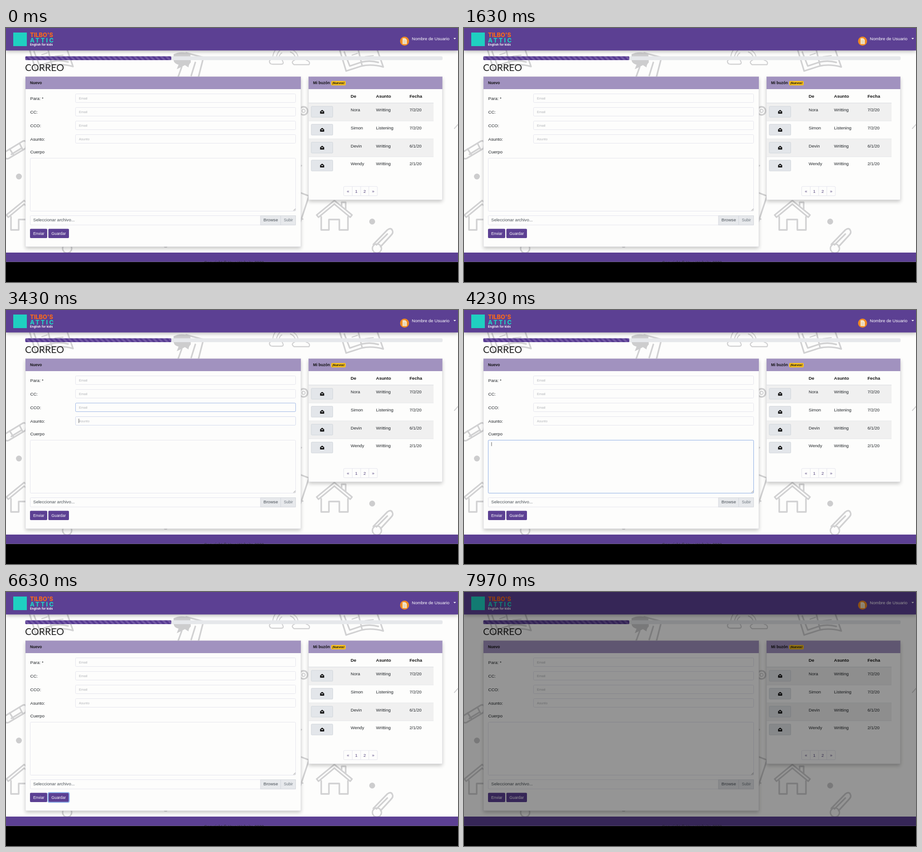
Recreate the animation shown at these times as an HTML page. Size 998 by 561 pixels, loop 8000 ms.

```html
<!DOCTYPE html>
<html lang="es">
<head>
<meta charset="utf-8">
<title>Correo</title>
<style>
  html, body { margin: 0; width: 100%; height: 100%; overflow: hidden; background: #000; }
  svg { display: block; width: 998px; height: 561px; }
  text { font-family: "Liberation Sans", Arial, sans-serif; font-size: 9.6px; fill: #212529; white-space: pre; }
  .b { font-weight: 700; fill: #111; }
  .brand { font-family: Inter, sans-serif; font-weight: 800; }
  .title { font-family: Lato, sans-serif; font-size: 21.2px; fill: #222; }
  .doodles { fill: none; stroke: #d1d1d2; stroke-width: 3.4; stroke-linejoin: round; stroke-linecap: round; }
  .doodles .solid { fill: #cdcdce; stroke: none; }
</style>
</head>
<body>
<svg id="stage" viewBox="0 0 998 561">
  <defs>
    <pattern id="stripes" width="11.7" height="11.7" patternUnits="userSpaceOnUse">
      <rect width="11.7" height="11.7" fill="#553990"/>
      <path d="M0 11.7V5.85L5.85 11.7ZM0 0H5.85L11.7 5.85V11.7Z" fill="#7258a5"/>
    </pattern>
    <filter id="soft" x="-10%" y="-10%" width="120%" height="130%"><feGaussianBlur stdDeviation="4.5"/></filter>
    <clipPath id="page"><rect width="998" height="516.5"/></clipPath>
  </defs>
  <g clip-path="url(#page)">
    <rect width="998" height="517" fill="#fdfdfc"/>
    <g class="doodles">
      <g id="book">
        <path d="M52 48L66 94L100 83Q122 78 148 85L135 48M62 52L74 83L101 74Q120 70 137 75M93 48L101 81"/>
        <path d="M79 59L91 55M82 67L94 63M108 62L126 60" stroke-width="2"/>
      </g>
      <use href="#book" x="685" y="1"/>
      <path d="M388 86L380 108M398 55L436 65L425 108M418 76L409 105"/>
      <path class="solid" d="M370 58Q386 50 407 57L408 76Q403 81 403 87L395 82Q384 88 377 91L381 81Q369 78 370 68Z"/>
      <path d="M589 64Q590 54 596 47M597 64Q599 55 605 49M603 64Q604 58 609 55M634 49Q643 54 645 64M628 53Q638 57 639 67" stroke-width="2"/>
      <path d="M584 79Q578 72 587 69Q590 62 599 67Q609 65 612 76Q613 80 607 80H588ZM636 81Q628 75 637 71Q641 62 651 67Q660 63 663 71Q673 74 669 81Z" stroke-width="2.3"/>
      <path d="M-4 275L37 250Q45 247 45 257L43 266L6 288Q-2 291 -6 281M8 267L17 281M30 255L37 269M12 279L35 265"/>
      <circle class="solid" cx="28.5" cy="328" r="6.5"/>
      <circle class="solid" cx="808.5" cy="427.5" r="6.5"/>
      <g id="house">
        <path d="M686 413L725 381L764 413L760 418L725 389L690 418ZM696 417V446H713V423H736V446H755V417M741 393V385H750V400"/>
      </g>
      <use href="#house" x="-685"/>
      <path d="M811 478L842 446Q850 440 853 447Q856 452 850 458L827 483M818 479L842 455"/>
      <circle cx="819" cy="487" r="10" stroke-width="3"/>
      <circle cx="135" cy="487" r="10" stroke-width="3"/>
      <circle cx="657" cy="183" r="9"/><circle cx="657" cy="183" r="3.5" stroke-width="2"/>
      <path d="M640 360L669 371L650 428M643 418L655 422M645 306L652 304"/>
      <path d="M990 222L999 212" stroke-width="2"/>
      <path class="solid" d="M347 481H358L355 485H350Z"/>
    </g>
    <rect y="2" width="998" height="50" fill="#000" opacity=".28" filter="url(#soft)"/>
    <rect width="998" height="49.6" fill="#5c4093"/>
    <rect x="16" y="10" width="30" height="30" fill="#1fd0c1"/>
    <rect x="42.5" y="62.5" width="921.5" height="8.5" rx="3" fill="#e6e8eb"/>
    <rect x="42.5" y="62.5" width="322.5" height="8.5" rx="2" fill="url(#stripes)"/>
    <g id="ui"></g>
    <rect id="shade" width="998" height="517" opacity="0"/>
  </g>
</svg>
<script>
const LOOP = 8000, STRIPE = 11.7, PAPER = '#fdfdfc';
const ui = document.getElementById('ui');
const shade = document.getElementById('shade');
const stripes = document.getElementById('stripes');

function add(tag, attrs, content) {
  const el = document.createElementNS('http://www.w3.org/2000/svg', tag);
  for (const key in attrs) el.setAttribute(key, attrs[key]);
  if (content) el.textContent = content;
  ui.append(el);
  return el;
}
const box = (x, y, width, height, fill, more = {}) => add('rect', { x, y, width, height, fill, ...more });
const path = (d, fill, more = {}) => add('path', { d, fill, ...more });
const label = (x, y, content, style = '', cls = '') => add('text', { x, y, style, class: cls }, content);
const outline = { stroke: '#e4e4ed', 'stroke-width': 1 };

function panel(x, y, w, h) {
  box(x, y + 4, w, h, '#000', { opacity: .22, filter: 'url(#soft)' });
  box(x, y, w, h, PAPER, { stroke: '#dddde2', 'stroke-width': .7 });
  box(x, y, w, 27.5, '#a192bf');
}

function envelope(x, y) {
  path(`M${x - 4.5} ${y - 1}L${x} ${y - 4.5}L${x + 4.5} ${y - 1}V${y + 4}H${x - 4.5}Z`, '#111');
  path(`M${x - 3} ${y - 1}H${x + 3}L${x} ${y + 1.3}Z`, '#e3e6ea');
}

// Header
label(53, 20, "TILBO'S", 'font-size:12.8px;fill:#f5681d', 'brand');
label(53, 32, 'ATTIC', 'font-size:12.8px;letter-spacing:3.2px;fill:#20cfc2', 'brand');
label(53, 38.6, 'English for kids', 'font-size:6.3px;font-weight:700;letter-spacing:.2px;fill:#fff', 'brand');
add('circle', { cx: 880, cy: 29, r: 10, fill: '#f18a22' });
path('M875.5 22.5H881.5L885 26V35.5H875.5Z', '#f6e5c6');
path('M877.5 28H883M877.5 30.5H883M877.5 33H883', 'none', { stroke: '#cdbb9c', 'stroke-width': .8 });
label(896, 27, 'Nombre de Usuario', 'fill:#fff');
path('M988 22H993.5L990.75 25Z', '#fff');
label(42, 94.5, 'CORREO', '', 'title');

// Message form
panel(43, 107.5, 608, 375.5);
label(53, 124, 'Nuevo', 'font-size:8.6px', 'b');
const fields = ['Para: *', 'CC:', 'CCO:', 'Asunto:'].map((name, i) => {
  const area = [153.5, 145.5 + i * 30, 486, 19], y = area[1];
  label(53.5, y + 13.5, name);
  box(...area, PAPER, { rx: 2, ...outline });
  label(161, y + 12, i < 3 ? 'Email' : 'Asunto', 'font-size:7.5px;fill:#b4b6ba');
  return area;
});
label(53.5, 277, 'Cuerpo');
const body = [53.5, 287.5, 586, 117];
box(...body, PAPER, { rx: 2, ...outline });
path('M634.5 403.5L639 399M637 403.5L639 401.5', 'none', { stroke: '#777', 'stroke-width': .8 });
box(53.5, 414.5, 586, 20.5, PAPER, { rx: 2, ...outline });
label(60, 427.3, 'Seleccionar archivo...', 'fill:#495057');
box(562, 414.5, 77.5, 20.5, '#e7e9ec', { ...outline, stroke: '#d3d6dc' });
path('M606.5 414.5V435', 'none', { stroke: '#d3d6dc' });
label(568.5, 427.3, 'Browse', 'fill:#495057');
label(613.5, 427.3, 'Subir', 'font-size:8.6px;fill:#6c757d');
const send = [53, 443.5, 38, 20.5], save = [93.5, 443.5, 45.5, 20.5];
for (const button of [send, save]) box(...button, '#5c4093', { rx: 2 });
label(60, 456.5, 'Enviar', 'font-size:8.7px;fill:#fff');
label(100.3, 456.5, 'Guardar', 'font-size:8.7px;fill:#fff');

// Inbox
panel(668, 107.5, 295.5, 272);
label(678, 124, 'Mi buzón', 'font-size:8.6px', 'b');
box(718, 117, 32, 9.7, '#f8c01d', { rx: 2 });
label(720.2, 124, '¡Nuevos!', 'font-size:6.4px', 'b');
const columns = [761, 817, 891];
['De', 'Asunto', 'Fecha'].forEach((name, i) => label(columns[i], 153.5, name, '', 'b'));
const mails = [['Nora', 'Writting', '7/2/20'], ['Simon', 'Listening', '7/2/20'],
               ['Devin', 'Writting', '6/1/20'], ['Wendy', 'Writting', '2/1/20']];
mails.forEach((mail, i) => {
  const y = 165.7 + i * 39.6;
  if (i % 2 === 0) box(668, y, 276, 39.6, '#f0f0f0');
  box(668, y - .5, 276, 1, i ? '#e6e8ea' : '#d6d9de');
  box(674, y + 7.3, 47.5, 24, '#e3e6ea', { rx: 1.5, stroke: '#d0d5db' });
  mail.forEach((value, j) => label(columns[j], y + 18.7, value));
});
const tap = box(681, 176, 34, 18, '#78afed');
mails.forEach((_, i) => envelope(698, 185.3 + i * 39.6));
box(745.5, 350, 74.5, 20.5, PAPER, { rx: 2, ...outline });
path('M764.5 350V370.5M783 350V370.5M801 350V370.5', 'none', outline);
[['«', 752.5], ['1', 770.8], ['2', 789.3], ['»', 808]].forEach(([sign, x]) => label(x, 363.5, sign, 'fill:#54447d'));

// Footer
box(0, 496, 998, 21, '#5c4093');
label(437, 520.5, 'Copyright © Your Website 2020', 'font-size:9.5px');

// Focus order: box, start, end, whether it is a button
const focusSteps = [
  [fields[0], 1680, 2150], [fields[1], 2150, 2850], [fields[2], 2850, 3400],
  [fields[3], 3400, 3950], [body, 3950, 4800],
  [send, 4800, 5450, true], [save, 5450, 7720, true],
].map(([area, start, end, isButton]) => {
  const [x, y, w, h] = area;
  const ring = isButton
    ? box(x - .5, y - .5, w + 1, h + 1, 'none', { rx: 3, stroke: '#8fb4ee', 'stroke-width': 2.2 })
    : box(x, y, w, h, 'none', { rx: 2, stroke: '#8aabe4', 'stroke-width': 1 });
  const caret = isButton ? null : box(x + 7, y + 4.5, .8, area === body ? 8.5 : 9.5, '#333');
  return { ring, caret, start, end };
});

const ramp = (t, start, length) => Math.max(0, Math.min(1, (t - start) / length));

function draw(t) {
  stripes.setAttribute('x', 42.5 + STRIPE * (1 - t / 1000 % 1));
  for (const { ring, caret, start, end } of focusSteps) {
    ring.setAttribute('opacity', ramp(t, start, 150) - ramp(t, end, 150));
    if (caret) caret.setAttribute('opacity', t >= start && t < end && (t - start) % 1060 < 530 ? 1 : 0);
  }
  tap.setAttribute('opacity', t >= 7750 && t < 7930 ? 1 : 0);
  shade.setAttribute('opacity', .5 * ramp(t, 7856, 140));
}

const began = performance.now();
function tick() {
  draw((performance.now() - began) % LOOP);
  requestAnimationFrame(tick);
}
tick();
</script>
</body>
</html>
```
